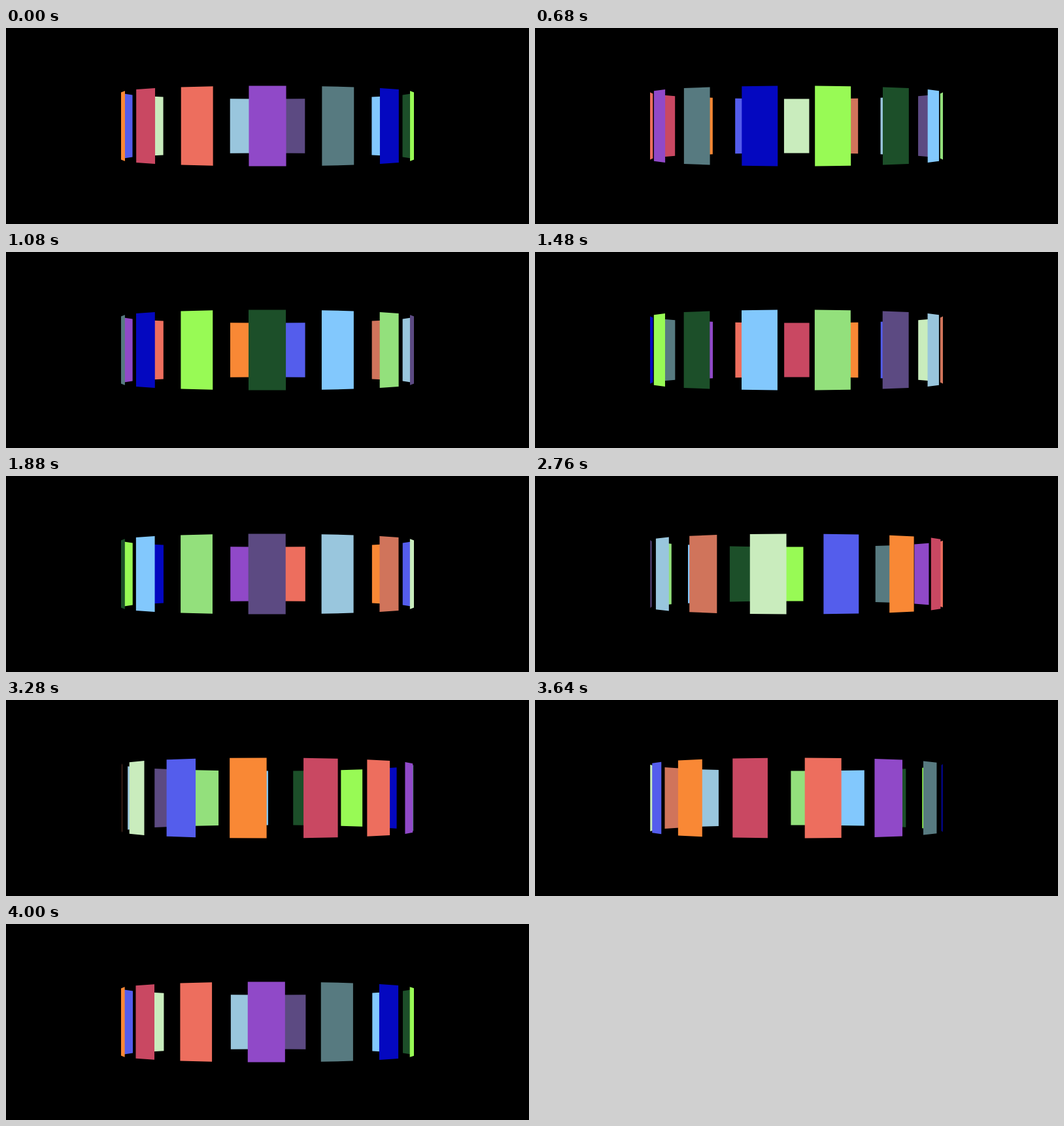
These frames come from a looping animation (800 by 300 pixels, 4040 ms). An HTML page:

```html
<!DOCTYPE html>
<html lang="en">
<head>
<meta charset="utf-8">
<title>Revolving panels</title>
<style>
  html, body { margin: 0; width: 100%; height: 100%; overflow: hidden; background: #000; }
  svg { display: block; width: 100%; height: 100%; }
</style>
</head>
<body>
<svg id="stage" viewBox="0 0 800 300"></svg>
<script>
const COLORS = [
  '#9049c8', '#577a80', '#0408c0', '#98fa55', '#1c4f29',
  '#82c8fd', '#93e07c', '#5c4a82', '#99c6dd', '#d0745b',
  '#c9ecbd', '#545dec', '#f98835', '#c94862', '#ed6e5e'
];
const CENTER = { x: 400, y: 150 };
const PANEL = { width: 46, height: 99 };
const RADIUS = 218.5;
const PERSPECTIVE = 1125;
const LOOP = 4040;
const FRAME = 40;
const TICK = 1001 / 30;      // the rotation advances in ticks of 29.97 Hz
const DEGREES_PER_MS = 0.09;

const stage = document.getElementById('stage');
const slots = COLORS.map(() => {
  const polygon = document.createElementNS('http://www.w3.org/2000/svg', 'polygon');
  return stage.appendChild(polygon);
});

function rotationAt(time) {
  const shown = Math.floor((time % LOOP) / FRAME) * FRAME;
  return Math.round(shown / TICK) * TICK * DEGREES_PER_MS;
}

function project(x, y, z) {
  const scale = PERSPECTIVE / (PERSPECTIVE - z);
  return `${(CENTER.x + x * scale).toFixed(2)},${(CENTER.y + y * scale).toFixed(2)}`;
}

function makePanel(color, index, rotation) {
  const angle = (index * 360 / COLORS.length - rotation) * Math.PI / 180;
  const sin = Math.sin(angle);
  const cos = Math.cos(angle);
  const halfWidth = PANEL.width / 2;
  const halfHeight = PANEL.height / 2;
  const corner = (side, level) => project(
    RADIUS * sin + side * halfWidth * cos,
    level * halfHeight,
    RADIUS * cos - side * halfWidth * sin
  );
  const points = [corner(-1, -1), corner(1, -1), corner(1, 1), corner(-1, 1)].join(' ');
  return { color, depth: cos, points };
}

function render(time) {
  const rotation = rotationAt(time);
  COLORS.map((color, i) => makePanel(color, i, rotation))
    .sort((a, b) => a.depth - b.depth)
    .forEach((panel, i) => {
      slots[i].setAttribute('points', panel.points);
      slots[i].setAttribute('fill', panel.color);
    });
}

function tick() {
  render(performance.now());
  requestAnimationFrame(tick);
}
tick();
</script>
</body>
</html>
```
